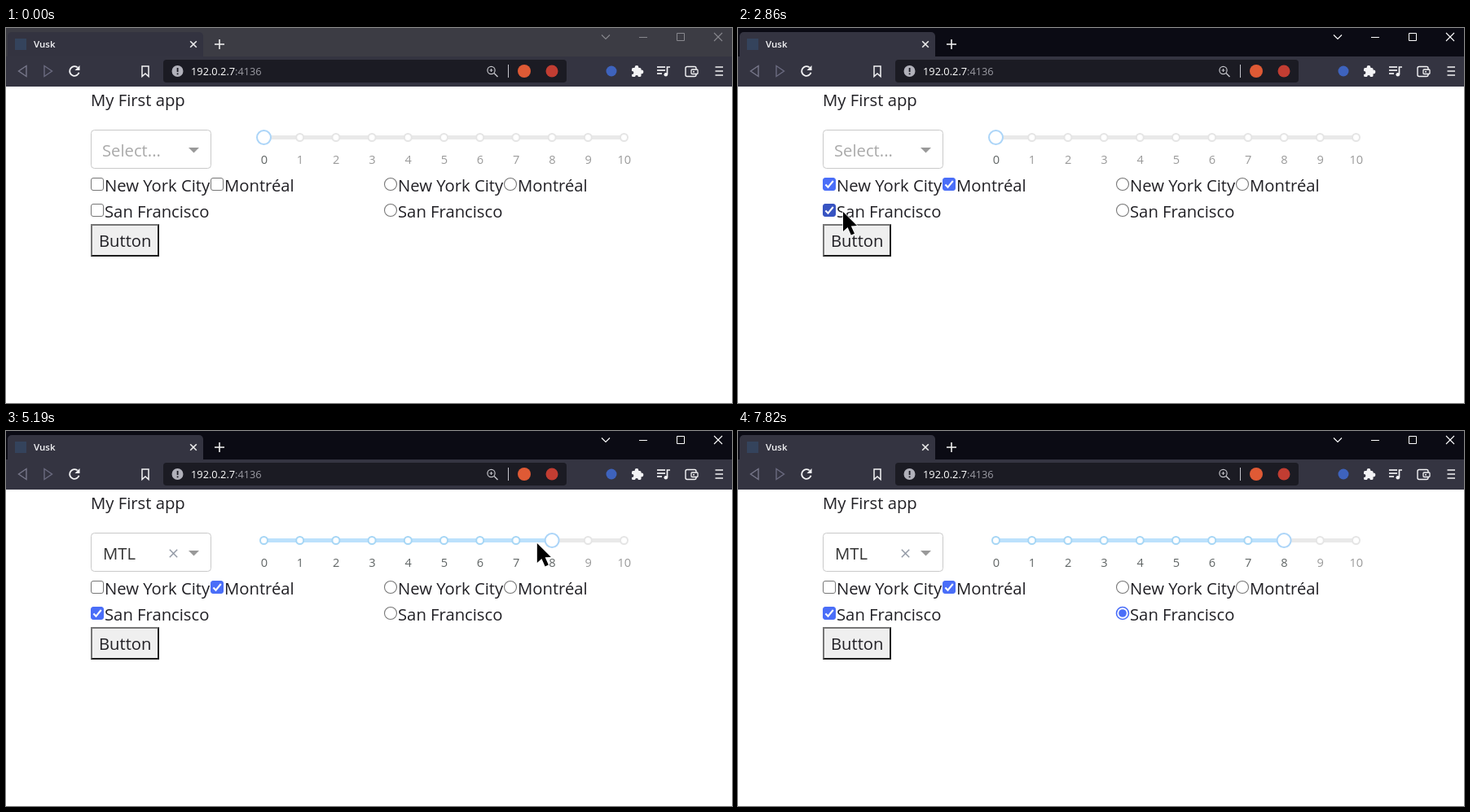
Animation, 891 px wide and 461 px high, one loop 8.2 s. Source, as an HTML page with a canvas:

```html
<!DOCTYPE html>
<html lang="en">
<head>
<meta charset="utf-8">
<title>Form demo</title>
<style>
  html, body { margin: 0; width: 100%; height: 100%; overflow: hidden; background: #fff; }
  canvas { display: block; }
</style>
</head>
<body>
<canvas id="stage" width="891" height="461"></canvas>
<script>
const ctx = document.getElementById('stage').getContext('2d');
const FONT = '"Open Sans", "Noto Sans", sans-serif';
const BLUE = '#4a6ef8', BAR = '#343441', WHITE = '#f3f3f5';
const LOOP = 8200, FIRST = 530, STEP = 72;

// Moments at which the page reacts.
const AT = {
  activate: 1530, checkNewYork: 1600, checkMontreal: 2400, checkSanFrancisco: 2830,
  openMenu: 3480, pickOption: 4050, grab: 4550, drop: 5300,
  radioNewYork: 6080, radioSanFrancisco: 6430, press: 7440, release: 7580, leave: 7800
};

const between = (t, a, b) => t >= a && t < b;
const stopX = i => 316.5 + 44.2 * i;

function options(x, states) {
  return [
    { x, y: 192, label: 'New York City', on: states[0] },
    { x: x + 147, y: 192, label: 'Montréal', on: states[1] },
    { x, y: 224, label: 'San Francisco', on: states[2] }
  ];
}
const checks = options(112, [
  t => between(t, AT.checkNewYork, AT.openMenu),
  t => t >= AT.checkMontreal,
  t => t >= AT.checkSanFrancisco
]);
const radios = options(472, [
  t => between(t, AT.radioNewYork, AT.radioSanFrancisco),
  () => false,
  t => t >= AT.radioSanFrancisco
]);

// Pointer glides: start time, duration, destination, downward sag.
const glide = (start, length, x, y, sag = 0) => ({ start, length, x, y, sag });
const ENTRY = { x: 764, y: 448 };
const GLIDES = [
  glide(530, 930, 167, 203),
  glide(1950, 370, checks[1].x, 190),
  glide(2450, 380, 129, 226),
  glide(3080, 320, 192, 152),
  glide(3540, 300, 187, 226),
  glide(4070, 560, 420, 137),
  glide(4780, 440, stopX(8) + 5, 138),
  glide(5320, 460, 508, 190),
  glide(5800, 220, radios[0].x + 8, 186),
  glide(6140, 230, radios[2].x, 219),
  glide(6530, 770, 150, 265, 45),
  glide(7560, 180, 600, 440)
];

function pointerAt(t) {
  let { x, y } = ENTRY;
  for (const g of GLIDES) {
    if (t < g.start) break;
    const u = Math.min(1, (t - g.start) / g.length);
    const ease = u * u * (3 - 2 * u);
    x += (g.x - x) * ease;
    y += (g.y - y) * ease + g.sag * Math.sin(Math.PI * u);
  }
  return { x, y };
}

function sliderValue(t) {
  return t < AT.grab ? 0 : Math.round((pointerAt(Math.min(t, AT.drop)).x - stopX(0)) / 44.2);
}

function rect(x, y, w, h, color) {
  ctx.fillStyle = color;
  ctx.fillRect(x, y, w, h);
}

function paint(fill, stroke, width = 1) {
  if (fill) { ctx.fillStyle = fill; ctx.fill(); }
  if (stroke) { ctx.strokeStyle = stroke; ctx.lineWidth = width; ctx.stroke(); }
}

function round(x, y, w, h, r, fill, stroke, width) {
  ctx.beginPath();
  ctx.roundRect(x, y, w, h, r);
  paint(fill, stroke, width);
}

function circle(x, y, r, fill, stroke, width) {
  ctx.beginPath();
  ctx.arc(x, y, r, 0, Math.PI * 2);
  paint(fill, stroke, width);
}

function poly(points, fill, stroke, width, closed = true) {
  ctx.beginPath();
  points.forEach(([x, y]) => ctx.lineTo(x, y));
  if (closed) ctx.closePath();
  paint(fill, stroke, width);
}

const line = (points, color, width = 1) => poly(points, null, color, width, false);

// Triangle with its base centred on x, y; dx, dy point to the tip.
function triangle(x, y, half, dx, dy, fill, stroke, width) {
  const sx = dy ? half : 0, sy = dx ? half : 0;
  poly([[x - sx, y - sy], [x + sx, y + sy], [x + dx, y + dy]], fill, stroke, width);
}

function cross(x, y, r, color, width) {
  line([[x - r, y - r], [x + r, y + r]], color, width);
  line([[x + r, y - r], [x - r, y + r]], color, width);
}

function plus(x, y, r, color, width) {
  line([[x, y - r], [x, y + r]], color, width);
  line([[x - r, y], [x + r, y]], color, width);
}

function text(str, x, y, size, color, align = 'left', weight = 400) {
  ctx.font = `${weight} ${size}px ${FONT}`;
  ctx.textAlign = align;
  ctx.fillStyle = color;
  ctx.fillText(str, x, y);
}

const body = (str, x, y, color = '#212025') => text(str, x, y, 20.25, color);

function drawTitleBar(active) {
  const ink = active ? '#fff' : '#88888e';
  rect(0, 0, 891, 36, active ? '#0b0b14' : '#3c3c44');
  round(2, 5, 240, 34, [5, 5, 0, 0], active ? BAR : '#333340');
  rect(11, 13, 14, 14, '#34435c');
  text('Vusk', 34, 24, 11.5, '#f4f4f6', 'left', 600);
  cross(230, 20, 3.8, '#eee', 1.6);
  plus(262, 20, 6, '#eee', 1.6);
  line([[731, 8.5], [736, 13.5], [741, 8.5]], ink, 1.1);
  line([[777, 11.5], [787, 11.5]], ink);
  round(823.5, 6.5, 9, 9, 0, null, ink);
  cross(874, 11, 5, ink, 1.1);
}

function drawNavigation() {
  triangle(25, 53, 6.5, -9.5, 0, null, '#77778a', 1.4);
  triangle(47, 53, 6.5, 9.5, 0, null, '#6b6b80', 1.4);
  ctx.beginPath();
  ctx.arc(84, 53, 5.8, 0.3, 5.4);
  paint(null, WHITE, 1.8);
  poly([[90.5, 46], [90.5, 52], [84.5, 52]], WHITE);
  poly([[167, 47], [175, 47], [175, 59.5], [171, 56], [167, 59.5]], null, WHITE, 1.5);
}

function drawAddress() {
  const field = '#1b1b23', grey = '#c4c4ca';
  round(193, 39, 495, 28, 4, field);
  circle(210.5, 53, 7, '#b1b1ba');
  rect(209.7, 49, 1.8, 5, field);
  rect(209.7, 55.5, 1.8, 1.8, field);
  text('192.0.2.7', 227, 58, 12.8, '#fff', 'left', 500);
  text(':4136', 281, 58, 12.8, '#9b9ba3');
  circle(595.5, 52, 4.6, null, grey, 1.2);
  line([[599, 55.5], [603.5, 60]], grey, 1.4);
  plus(595.5, 52, 2, grey);
  rect(616, 45, 1, 16, grey);
  circle(636, 53, 8, '#df5a35');
  circle(670, 53, 7.5, '#c23d32');
}

function drawExtensions() {
  circle(743, 53, 6.5, '#3e63bd');

  round(768, 49, 11.5, 11, 1.5, WHITE);
  circle(774, 48.5, 2.4, WHITE);
  circle(780, 54, 2.4, WHITE);
  circle(768.5, 55, 1.9, BAR);
  circle(774, 60, 1.9, BAR);

  for (let i = 0; i < 3; i++) {
    line([[799, 48 + 4 * i], [i < 2 ? 809 : 805, 48 + 4 * i]], WHITE, 1.7);
    line([[870.5, 48 + 5 * i], [880, 48 + 5 * i]], WHITE, 1.5);
  }
  line([[811.5, 57], [811.5, 48], [815, 48]], WHITE, 1.7);
  circle(809.8, 57.2, 2.3, WHITE);

  round(834, 47.5, 13, 12, 2, null, WHITE, 1.4);
  round(841, 51, 8, 5.5, 1, BAR, WHITE, 1.3);
  circle(844, 53.7, 1, WHITE);
}

function isOver(item, pointer) {
  if (!pointer) return false;
  ctx.font = `20.25px ${FONT}`;
  const width = 17 + ctx.measureText(item.label).width;
  return between(pointer.x, item.x - 8, item.x - 8 + width) && Math.abs(pointer.y - item.y - 1.5) < 16;
}

function drawOption({ x, y, label, on }, isOn, hover, isRadio) {
  const edge = isOn ? (hover ? '#3854c2' : BLUE) : (hover ? '#454545' : '#767676');
  if (isRadio) {
    circle(x, y, 7.5, '#fff', edge, isOn ? 1.6 : 1.1);
    if (isOn) circle(x, y, 4.8, edge);
  } else {
    round(x - 7.5, y - 7.5, 15, 15, 2.5, isOn ? edge : '#fff', edge);
    if (isOn) line([[x - 4.6, y + 0.5], [x - 1.5, y + 3.6], [x + 4.8, y - 4]], '#fff', 2.1);
  }
  body(label, x + 9, y + 9);
}

function drawButton(pressed, hover) {
  const light = '#767676', dark = '#1c1c1c';
  rect(104, 241, 84, 40, pressed ? dark : light);
  poly([[188, 241], [188, 281], [104, 281], [106, 279], [186, 279], [186, 243]], pressed ? light : dark);
  rect(106, 243, 80, 36, pressed ? '#f5f5f5' : hover ? '#e5e5e5' : '#efefef');
  body('Button', 114, 269);
}

function drawSlider(value) {
  round(314, 132, 447, 5, 2.5, '#e9e9e9');
  rect(stopX(0), 132, stopX(value) - stopX(0), 5, '#bce1fc');
  for (let i = 0; i <= 10; i++) {
    const lit = i <= value;
    circle(stopX(i), 134.5, 4.5, '#fff', lit ? '#a6d6f5' : '#e5e5e5', 2);
    text(i, stopX(i) + 0.3, 167, 14.6, lit ? '#5f6464' : '#999', 'center');
  }
  circle(stopX(value), 134.5, 8.5, '#fff', '#acd5f8', 2);
}

function drawSelect(open, chosen, pointer) {
  round(104.5, 125.5, 147, 47, open ? [4, 4, 0, 0] : 4, '#fff', '#c9c9c9');
  if (chosen) {
    body('MTL', 119, 158, '#333');
    cross(205.5, 150.5, 4.7, '#939aa6', 1.5);
  } else {
    body('Select...', 118, 158, '#aaa');
  }
  triangle(230.5, open ? 155 : 147, 6.5, 0, open ? -6.5 : 6.5, '#999');
  if (!open) return;

  rect(118, 138, 1, 27, '#222');
  round(104.5, 172.5, 147, 142, [0, 0, 4, 4], '#fff', '#c9c9c9');
  rect(105, 172, 146, 1, '#e6e6e6');
  const focus = pointer.y >= 220 ? 1 : 0;
  ['NYC', 'MTL', 'SF'].forEach((name, i) => {
    if (i === focus) rect(105, 173 + 47 * i, 145, 46, '#ebf0fe');
    body(name, 116, 204 + 47 * i, '#36363a');
  });
}

function drawPointer({ x, y }) {
  const arrow = [[0, 0], [0, 24], [5.6, 19], [9.8, 28.5], [14, 26.7], [9.8, 17.4], [17, 17]];
  ctx.save();
  ctx.translate(x, y);
  poly(arrow, null, '#fff', 1.4);
  poly(arrow, '#000');
  ctx.restore();
}

function draw(t) {
  const pointer = between(t, FIRST, AT.leave) ? pointerAt(t) : null;
  const open = between(t, AT.openMenu, AT.pickOption);
  const target = open || between(t, AT.grab, AT.drop) ? null : pointer;
  const overButton = target && between(target.x, 104, 188) && between(target.y, 241, 281);

  rect(0, 0, 891, 461, '#fff');
  drawTitleBar(t >= AT.activate);
  rect(0, 35, 891, 37, BAR);
  drawNavigation();
  drawAddress();
  drawExtensions();
  body('My First app', 104, 96);
  for (const group of [checks, radios]) {
    for (const item of group) drawOption(item, item.on(t), isOver(item, target), group === radios);
  }
  drawButton(between(t, AT.press, AT.release), overButton);
  drawSlider(sliderValue(t));
  drawSelect(open, t >= AT.pickOption, pointer);
  if (pointer) drawPointer(pointer);
}

const begin = performance.now();
function tick() {
  const t = (performance.now() - begin) % LOOP;
  draw(t < FIRST ? 0 : FIRST + STEP * Math.floor((t - FIRST) / STEP));
  requestAnimationFrame(tick);
}
tick();
</script>
</body>
</html>
```
